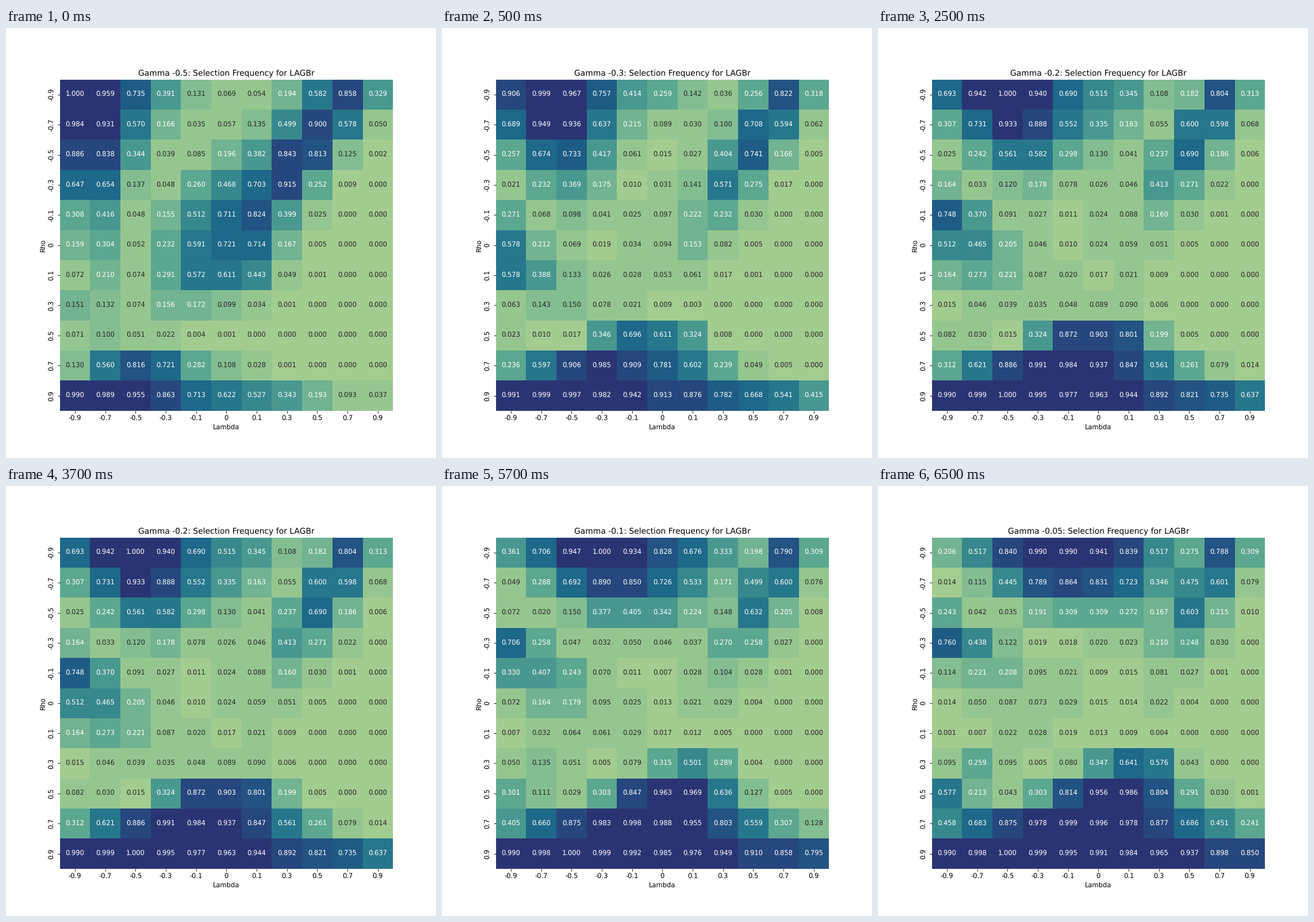
Recreate the animation shown at these times as a matplotlib script. Size 748x748 px, loop 8 s.

```python
import numpy as np
import matplotlib.pyplot as plt
from matplotlib.animation import FuncAnimation
from matplotlib.colors import BoundaryNorm, LinearSegmentedColormap, ListedColormap

plt.rcParams.update({"font.family": "DejaVu Sans", "text.hinting": "none"})
SIZE = 748
STEP_MS, FRAMES = 500, 16
GAMMAS = [-0.5, -0.3, -0.2, -0.1, -0.05]
TICKS = [-0.9, -0.7, -0.5, -0.3, -0.1, 0, 0.1, 0.3, 0.5, 0.7, 0.9]
N = len(TICKS)
lam, rho = np.meshgrid(TICKS, TICKS)


def top_hill(g):
    """Flat-topped hill on the upper edge, sliding right as gamma grows."""
    s = rho + .9
    center = -.083 + 2.43 * g + 1.7 * g**2 + (.4 + .55 * g) * s
    depth = 24 * np.exp(5.5 * g) * s**3
    return depth + 4 * np.exp(3.8 * s) * abs(lam - center)**2.6


def left_ridge(g):
    """Ridge entering from the left edge and climbing upward."""
    u = lam + .9
    center = -.4 - 1.5 * g + .4 * u
    return .25 + 25 * g**4 + 1.7 * u + 3 * u**2 + 38 * (rho - center)**2


def diagonal_ridge(g):
    """Ridge from the upper right to the middle, shrinking toward its top end."""
    h = g + .5
    d = lam - (.06 + .4 * h - (.72 - .44 * h) * rho)
    depth = .04 + .7 * (rho + .5)**2 + .08 * np.exp(9 * rho) + 7.7 * h * np.exp(4 * rho)
    return depth + np.where(d < 0, 9 + 90 * h, 26) * d**2


def bottom_hill(g):
    """Plateau on the lower edge that widens and rises."""
    center = .25 - .9 * rho**3 + .8 * g
    depth = np.exp(3.1 - 16 * rho - 13 * g)
    return depth + np.exp(4.6 - 9.2 * rho**2 - 5.3 * g) * abs(lam - center)**2.6


def corner_spot(g):
    """Small late spot at the lower left."""
    return -.2 - 13 * g + 40 * (rho - .45)**2 + 25 * (lam + .4 + rho)**2


def frequencies(g):
    hills = (top_hill, left_ridge, diagonal_ridge, bottom_hill, corner_spot)
    return 1 - np.prod([1 - np.exp(-hill(g)) for hill in hills], axis=0)


# Stepped shades along a green-to-navy ramp
ramp = LinearSegmentedColormap.from_list("ramp", [
    "#a5cd90", "#7dba91", "#59a590", "#40908e", "#287a8c", "#1c6488", "#254b7f", "#2c3172"])
EDGES = np.array([0, .0195, .0975, .15, .23, .32, .43, .538,
                  .6375, .733, .783, .835, .9225, 1.04])
shades = ListedColormap(ramp((EDGES[:-1] + EDGES[1:]) / 2))
norm = BoundaryNorm(EDGES, shades.N)
WHITE_TEXT_FROM = .152

fig, ax = plt.subplots(figsize=(9, 9), dpi=SIZE / 9)
mesh = ax.pcolormesh(np.zeros((N, N)), cmap=shades, norm=norm)
ax.set(xlim=(0, N), ylim=(N, 0))
ax.set_xlabel("Lambda", labelpad=3)
ax.set_ylabel("Rho", labelpad=3)
ax.spines[:].set_visible(False)
centers = np.arange(N) + .5
names = [f"{tick:g}" .replace("\u2212", "-") for tick in TICKS]
ax.set_xticks(centers, names)
ax.set_yticks(centers, names, rotation="vertical", va="center")
title = ax.set_title("")
labels = [ax.text(x, y, "", ha="center", va="center") for y in centers for x in centers]


def update(frame):
    # The first panel shows for one step, each later one for four
    gamma = GAMMAS[(frame + 3) // 4]
    values = frequencies(gamma)
    title.set_text(f"Gamma {gamma:g}: Selection Frequency for LAGBr")
    mesh.set_array(values)
    for label, value in zip(labels, values.flat):
        label.set_text(f"{value:.3f}")
        label.set_color("white" if value > WHITE_TEXT_FROM else ".15")
    return [title, mesh, *labels]


anim = FuncAnimation(fig, update, frames=FRAMES, interval=STEP_MS, repeat=True, blit=False)
plt.show()
```
